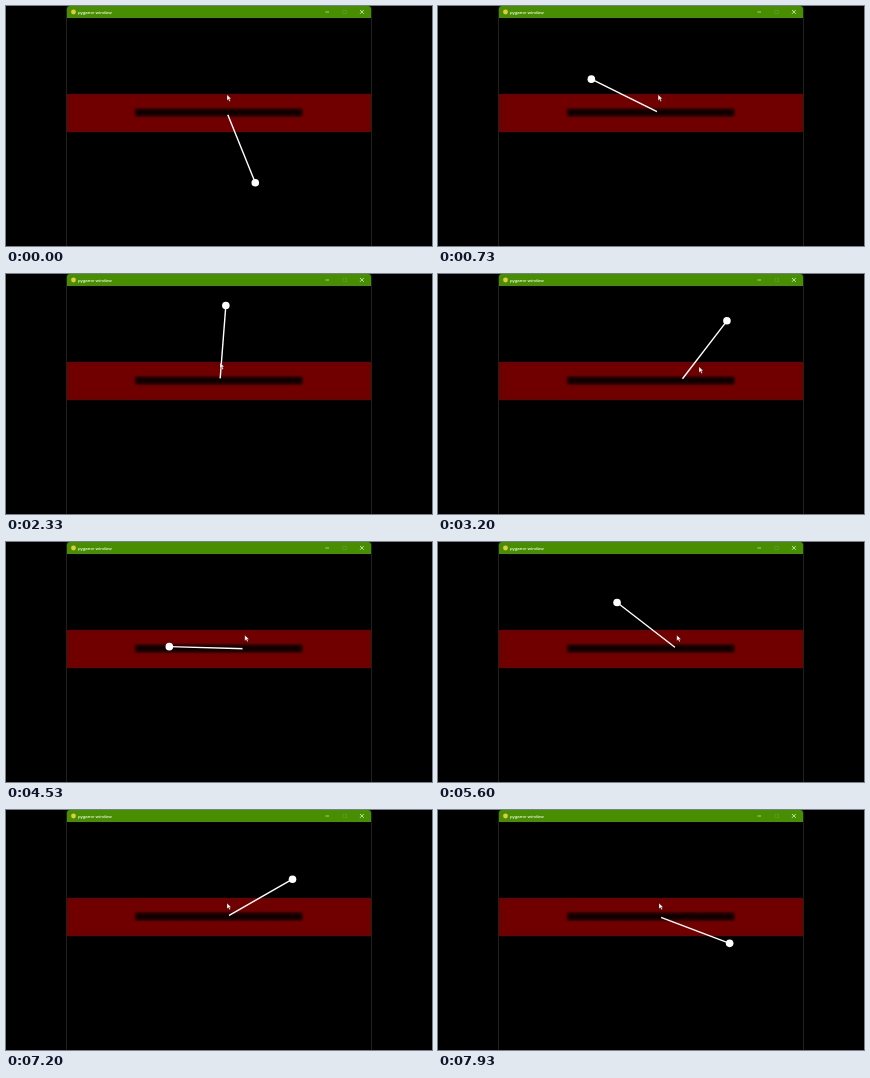
An HTML page that plays this animation: 426 by 240 pixels, repeating every 8000 ms.

```html
<!DOCTYPE html>
<html lang="en">
<head>
<meta charset="utf-8">
<title>Pendulum on a cart</title>
<style>
  html, body { margin: 0; width: 100%; height: 100%; overflow: hidden; background: #000; }
  svg { display: block; width: 100%; height: 100%; }
  text { font: 600 4.3px "Open Sans", sans-serif; fill: #f4f8ec; }
</style>
</head>
<body>
<svg viewBox="0 0 426 240">
  <defs>
    <filter id="soft" x="-5%" y="-60%" width="110%" height="220%">
      <feGaussianBlur stdDeviation="0.9"/>
    </filter>
  </defs>
  <rect width="426" height="240"/>
  <path d="M60.5 240V3a3 3 0 0 1 3-3h299a3 3 0 0 1 3 3v237" fill="none" stroke="#262c14" stroke-width=".8"/>
  <path d="M61 12V3q0-3 3-3h298q3 0 3 3v9z" fill="#478e00"/>
  <circle cx="67.5" cy="6" r="2.4" fill="#e8c83c"/>
  <text x="72" y="7.7">pygame window</text>
  <g fill="none" stroke-width=".8">
    <path d="M319.5 6h3.5" stroke="#c5dcae"/>
    <rect x="337" y="4.2" width="3.4" height="3.4" stroke="#5f9a2a"/>
    <path d="M354 4l3.8 3.8m0-3.8L354 7.8" stroke="#e4f0d8"/>
  </g>
  <rect x="61" y="88" width="304" height="38" fill="#700000"/>
  <rect x="129.3" y="102.8" width="167" height="7.4" fill="#0e0000" filter="url(#soft)"/>
  <line id="rod" stroke="#fff" stroke-width="1.4"/>
  <circle id="cart" r="2.4" fill="#0e0000"/>
  <circle id="bob" r="3.8" fill="#fff"/>
  <path id="cursor" d="M0 0v5.6l1.4-1.2 1 2.2 1-.5-1-2.1h1.8z" fill="#fff" stroke="#222" stroke-width=".3"/>
</svg>
<script>
const LOOP = 8, FPS = 15, ROD = 75.5, TRACK_Y = 106.7;
const GRAVITY = 4.54;    // g / length, per second squared
const CART_LAG = 0.253;  // the cart follows the cursor, in seconds
const MOVE_TIME = 0.6;
const RAD = Math.PI / 180;

// Seconds, degrees from hanging down, degrees per second.
const poses = [
  [0, 22, -250], [1.533, -169.4, -27], [3.2, -217.5, -74], [4.533, -451.5, -150],
  [5.6, -487.7, 69], [7.2, -240.2, 20], [7.933, -290.6, -150]
];
// Cursor moves: start in seconds, distance.
const moves = [[.6, -7], [2.6, 47], [3.5, -22.2], [5.8, -17.8]];

const clamp = u => Math.min(1, Math.max(0, u));
const smooth = u => u * u * (3 - 2 * u);
const moved = (t, start) => smooth(clamp((t - start) / MOVE_TIME));
const cursorX = t => moves.reduce((x, [start, distance]) => x + distance * moved(t, start), 221);

function swingFree([, degrees, rate], duration) {
  const steps = 200, dt = duration / steps;
  let angle = degrees * RAD, speed = rate * RAD;
  for (let i = 0; i < steps; i++) {
    const half = speed - GRAVITY * Math.sin(angle) * dt / 2;
    angle += half * dt;
    speed = half - GRAVITY * Math.sin(angle) * dt / 2;
  }
  return angle;
}

// Free swing from the last pose, nudged so that it arrives at the next one.
function angleAt(t) {
  const i = poses.findLastIndex(pose => pose[0] <= t);
  const from = poses[i], to = poses[i + 1], free = swingFree(from, t - from[0]);
  if (!to) return free;
  const duration = to[0] - from[0];
  const miss = to[1] * RAD - swingFree(from, duration);
  return free + miss * smooth((t - from[0]) / duration);
}

const [rod, cart, bob, cursor] = ["rod", "cart", "bob", "cursor"].map(id => document.getElementById(id));
const set = (el, attrs) => Object.entries(attrs).forEach(([name, value]) => el.setAttribute(name, value));

function draw(seconds) {
  const t = Math.floor((seconds % LOOP + 0.005) * FPS) % (LOOP * FPS) / FPS;
  const x = cursorX(t - CART_LAG), angle = angleAt(t);
  const bx = x + ROD * Math.sin(angle), by = TRACK_Y + ROD * Math.cos(angle);
  set(rod, { x1: x, y1: TRACK_Y, x2: bx, y2: by });
  set(cart, { cx: x, cy: TRACK_Y });
  set(bob, { cx: bx, cy: by });
  set(cursor, { transform: `translate(${cursorX(t)} ${88.8 + 4.4 * moved(t, 2.7)})` });
}

function tick() {
  draw(performance.now() / 1000);
  requestAnimationFrame(tick);
}
tick();
</script>
</body>
</html>
```
